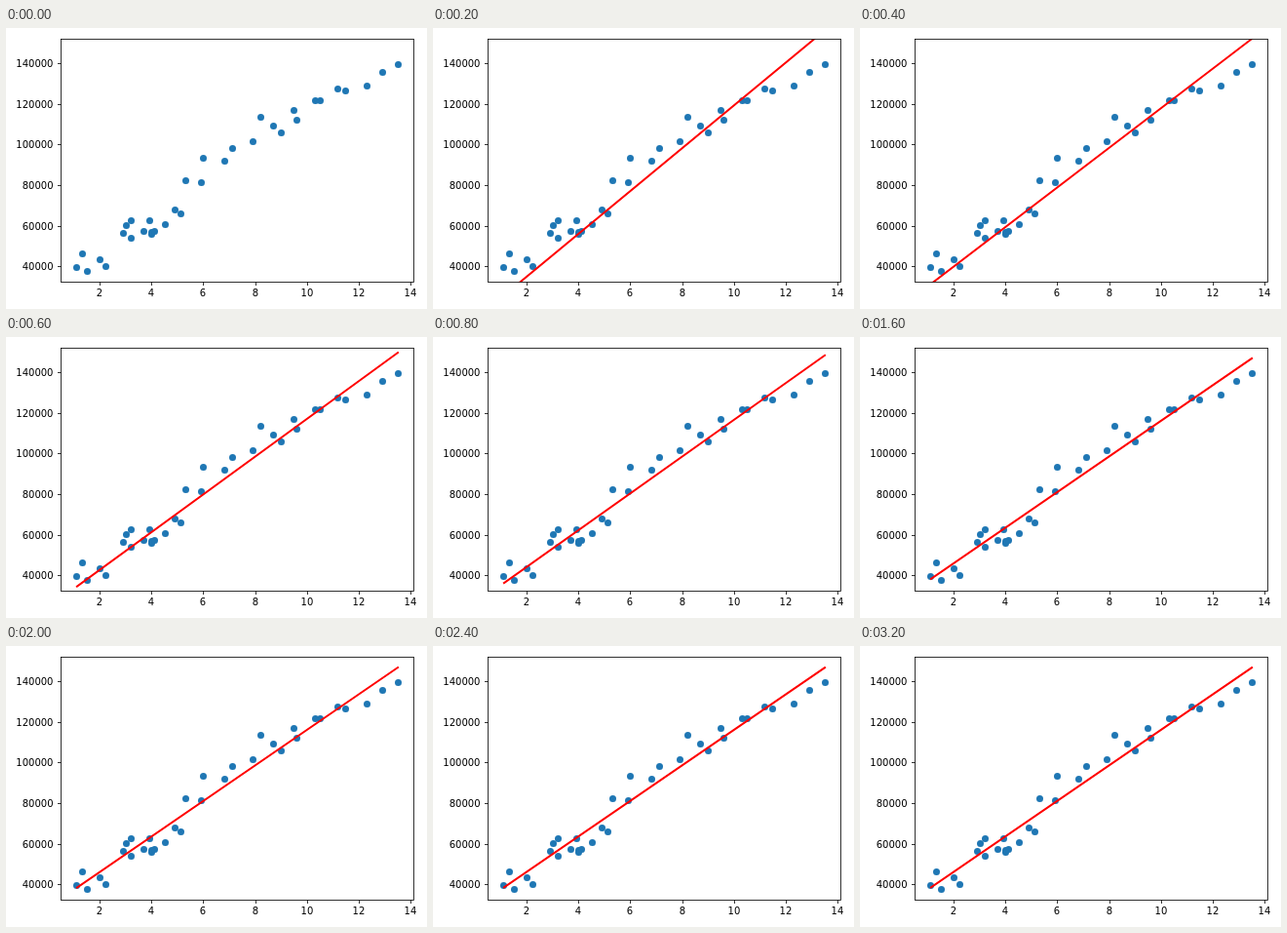
These frames come from a looping animation (432x288 px, 3600 ms). An HTML page:

```html
<!DOCTYPE html>
<html lang="en">
<head>
<meta charset="utf-8">
<title>Line fit</title>
<style>
  html, body { margin: 0; width: 100%; height: 100%; overflow: hidden; background: #fff; }
  svg { display: block; width: 432px; height: 288px; }
  text { font: 10px "DejaVu Sans", sans-serif; fill: #000; }
</style>
</head>
<body>
<svg viewBox="0 0 432 288">
  <clipPath id="plot"><rect x="56.5" y="11.5" width="362" height="249"/></clipPath>
  <g id="dots" fill="#1f77b4"></g>
  <line id="fit" clip-path="url(#plot)" stroke="#f00" stroke-width="2" stroke-linecap="square"/>
  <g id="axes" stroke="#000" stroke-width=".8" fill="none">
    <rect x="56.5" y="11.5" width="362" height="249"/>
  </g>
  <g id="labels"></g>
</svg>
<script>
const LOOP = 3600, STEP = 200, LAST = 16;
const SLOPE = 6.3;

// Dots lie on parallel rising bands: y (thousands) = level + SLOPE * x.
const bands = {
  26: [2.2],
  28.3: [1.5],
  30.7: [2, 4],
  31.5: [4, 4.1],
  32.6: [1.1, 4.5],
  34: [3.2, 3.7, 5.1],
  37.1: [4.9],
  38.3: [1.3, 2.9, 3.9],
  41.2: [3],
  42.6: [3.2],
  44.2: [5.9],
  49.1: [5.3, 6.8, 9],
  51.7: [7.9, 9.6, 12.3],
  53.5: [7.1],
  54.4: [8.7, 11.5, 12.9, 13.5],
  55.9: [6, 10.5],
  57.1: [9.5, 10.3, 11.2],
  62.1: [8.2]
};

const px = x => 56.48 + (x - 0.48) * 26.54;
const py = y => 244.7 - (y - 40) * 2.08;
const snap = v => Math.floor(v) + 0.5;
const byId = id => document.getElementById(id);

function add(parent, tag, attrs, text = "") {
  const el = document.createElementNS("http://www.w3.org/2000/svg", tag);
  for (const key in attrs) el.setAttribute(key, attrs[key]);
  el.textContent = text;
  byId(parent).append(el);
}

for (const [level, xs] of Object.entries(bands)) {
  for (const x of xs) {
    const y = Number(level) + SLOPE * x;
    add("dots", "circle", { cx: snap(px(x)), cy: snap(py(y)), r: 3.5 });
  }
}

for (let v = 2; v <= 14; v += 2) {
  const x = snap(px(v));
  add("axes", "path", { d: `M${x} 260.5v3.5` });
  add("labels", "text", { x: x - 0.6, y: 275, "text-anchor": "middle" }, v);
}
for (let v = 40; v <= 140; v += 20) {
  const y = snap(py(v));
  add("axes", "path", { d: `M56.5 ${y}h-3.5` });
  add("labels", "text", { x: 48.5, y: y + 3.5, "text-anchor": "end" }, v * 1000);
}

const fit = byId("fit");
fit.setAttribute("x1", px(1.1));
fit.setAttribute("x2", px(13.5));

// Each step shrinks the remaining error by the same factor.
function draw(time) {
  const step = Math.min(Math.floor((time % LOOP) / STEP), LAST);
  const error = 0.557 ** (step - 1);
  fit.setAttribute("visibility", step ? "visible" : "hidden");
  fit.setAttribute("y1", 247.4 + 26.6 * error);
  fit.setAttribute("y2", 22.2 - 19.8 * error);
}

const start = performance.now();
function tick() {
  draw(performance.now() - start);
  requestAnimationFrame(tick);
}
tick();
</script>
</body>
</html>
```
